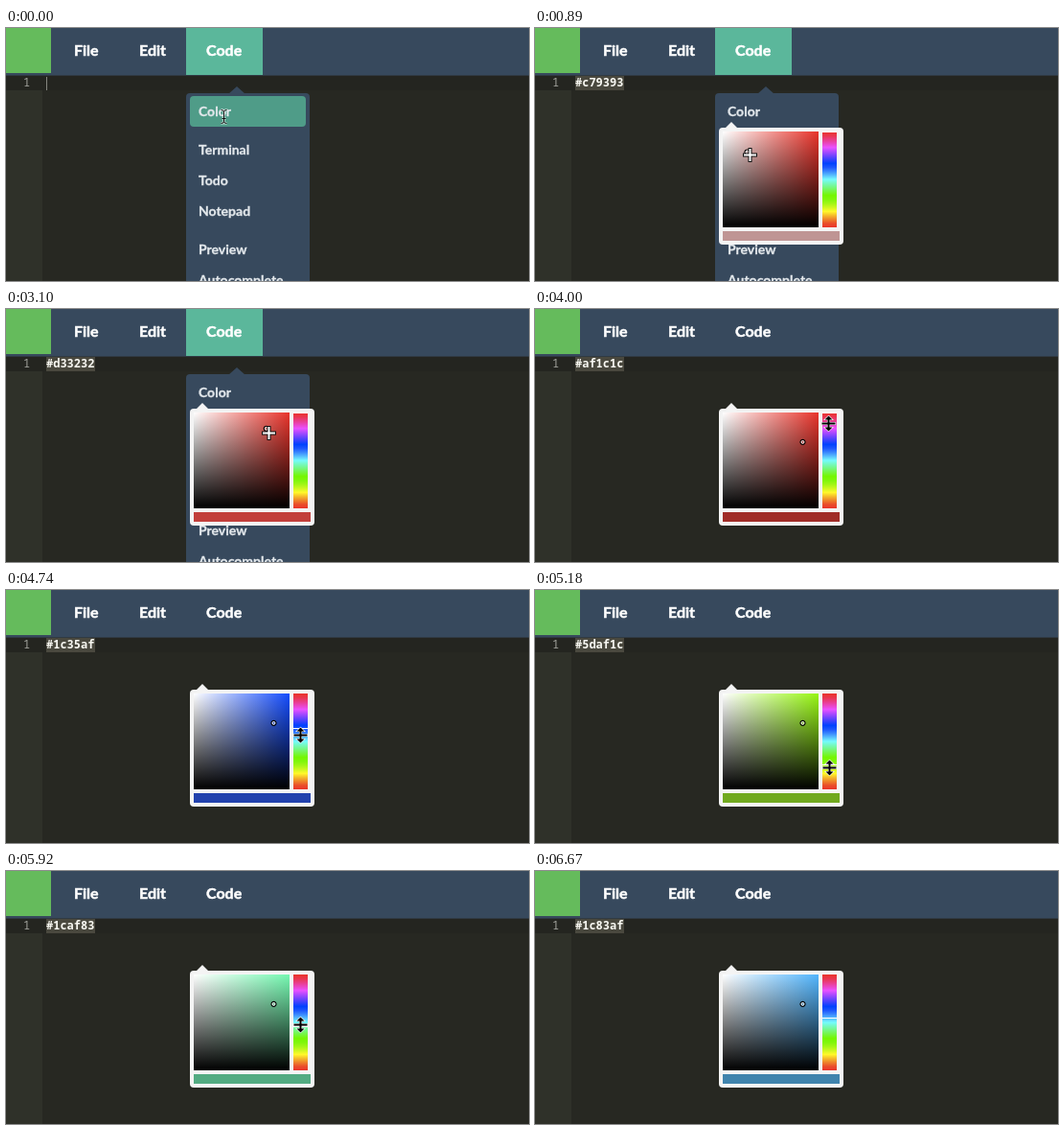
An HTML page for the animation above (7.24 s loop, 546 by 264 pixels).

```html
<!DOCTYPE html>
<html lang="en">
<head>
<meta charset="utf-8">
<title>Colour picker in a code editor</title>
<style>
  html, body { margin: 0; width: 100%; height: 100%; overflow: hidden; background: #272822; }
  svg { display: block; width: 546px; height: 264px; }
  .bar { font: 700 16px Lato, sans-serif; fill: #fff; stroke: #fff; stroke-width: .5; }
  .item { font: 700 14px Lato, sans-serif; fill: #e3e8ec; stroke: #e3e8ec; stroke-width: .3; }
  .code { font: 700 12px "Noto Sans Mono", "DejaVu Sans Mono", monospace; fill: #f8f8f2; }
  .line { font: 12px "Noto Sans Mono", "DejaVu Sans Mono", monospace; fill: #a0a19b; }
</style>
</head>
<body>
<svg viewBox="0 0 546 264">
  <defs>
    <linearGradient id="white"><stop stop-color="#fff"/><stop offset="1" stop-color="#fff" stop-opacity="0"/></linearGradient>
    <linearGradient id="black" x2="0" y2="1"><stop stop-opacity="0"/><stop offset="1"/></linearGradient>
    <linearGradient id="spectrum" x2="0" y2="1"></linearGradient>
  </defs>

  <rect width="546" height="264" fill="#272822"/>
  <rect y="50" width="38" height="214" fill="#2f3129"/>
  <rect y="50" width="546" height="15" fill="#242520"/>
  <text class="line" x="18" y="61">1</text>
  <rect id="caret" x="42" y="51" width="1" height="14" fill="#85867f"/>
  <rect id="selection" x="42" y="50" width="51" height="15" fill="#49483e"/>
  <text id="code" class="code" x="42" y="61"></text>

  <rect width="546" height="49" fill="#37495d"/>
  <rect y="49" width="546" height="1" fill="#303a43"/>
  <rect width="47" height="47" fill="#65bb5c"/>
  <rect id="tab" x="188" width="80" height="49" fill="#5bb79b"/>
  <g class="bar">
    <text x="71" y="29">File</text>
    <text x="139" y="29">Edit</text>
    <text x="209" y="29">Code</text>
  </g>

  <g id="menu">
    <path d="M232 69L241 61L250 69Z" fill="#37495d"/>
    <rect x="188" y="68" width="129" height="210" rx="4" fill="#37495d"/>
    <rect id="hover" x="192" y="71" width="121" height="32" rx="4" fill="#4f9c88"/>
    <g class="item">
      <text x="201" y="92">Color</text>
      <text x="201" y="132">Terminal</text>
      <text x="201" y="164">Todo</text>
      <text x="201" y="196">Notepad</text>
      <text x="201" y="236">Preview</text>
      <text x="201" y="268">Autocomplete</text>
    </g>
  </g>

  <g id="picker">
    <path d="M198 105L205 98L212 105Z" fill="#f4f4f4"/>
    <rect x="192" y="104" width="130" height="122" rx="4" fill="#f4f4f4"/>
    <rect id="field" x="196" y="108" width="100" height="100"/>
    <rect x="196" y="108" width="100" height="100" fill="url(#white)"/>
    <rect x="196" y="108" width="100" height="100" fill="url(#black)"/>
    <rect x="300" y="108" width="15" height="100" fill="url(#spectrum)"/>
    <rect id="slider" x="300" width="15" height="1" fill="#fff"/>
    <rect id="swatch" x="196" y="212" width="122" height="10"/>
    <g id="marker" fill="none">
      <circle r="2.5" stroke="#000" stroke-width="1.2"/>
      <circle r="1.4" stroke="#fff"/>
    </g>
  </g>

  <g id="beam" fill="none">
    <path d="M-3 -7Q0 -7 0 -5V5Q0 7 -3 7M3 -7Q0 -7 0 -5V5Q0 7 3 7M-2 2H2" stroke="#fff" stroke-width="2.4" opacity=".6"/>
    <path d="M-3 -7Q0 -7 0 -5V5Q0 7 -3 7M3 -7Q0 -7 0 -5V5Q0 7 3 7M-2 2H2" stroke="#111"/>
  </g>
  <g id="cross">
    <path d="M-7.5 0H7.5M0 -7.5V7.5" stroke="#111" stroke-width="4"/>
    <path d="M-6.5 0H6.5M0 -6.5V6.5" stroke="#fff" stroke-width="2"/>
  </g>
  <path id="resize" d="M0 -8L4 -4H1V-1H7V1H1V4H4L0 8L-4 4H-1V1H-7V-1H-1V-4H-4Z"
        fill="#000" stroke="#fff" stroke-width="1.2" paint-order="stroke"/>
</svg>
<script>
const LOOP = 7240, STEP = 148.2;
const LEFT = 196, TOP = 108, BOTTOM = 208;
// Steps at which the scene changes.
const OPEN = 1, FIELD_DRAG = 6, FIELD_END = 23, MENU_CLOSE = 25, HUE_DRAG = 29, LEAVE = 44;
const LAG = 0.5; // the picker trails the pointer by half a step

const $ = id => document.getElementById(id);
const show = (id, on) => $(id).setAttribute("display", on ? "inline" : "none");
const move = (id, x, y) => $(id).setAttribute("transform", `translate(${x} ${y})`);
const clamp = p => Math.max(0, Math.min(1, p));
const mix = (a, b, p) => a.map((v, i) => v + (b[i] - v) * p);

// Turning points of the two drags.
const fieldDrag = [
  { at: 6, to: [222, 130] }, { at: 9, to: [236, 140] }, { at: 10, to: [236, 140] },
  { at: 13, to: [248.4, 150.35] }, { at: 15, to: [246, 156] }, { at: 18, to: [262, 118] },
  { at: 21, to: [272.3, 125.25] }, { at: 23, to: [280, 139.37] }
];
const hueDrag = [
  { at: 30, to: [119] }, { at: 35, to: [182.04] }, { at: 36.5, to: [191] },
  { at: 40, to: [162.99] }, { at: 42, to: [153.01] }
];

function along(path, k) {
  const i = Math.max(1, path.findIndex(p => p.at >= k));
  const [a, b] = k > path.at(-1).at ? path.slice(-2) : [path[i - 1], path[i]];
  return mix(a.to, b.to, clamp((k - a.at) / (b.at - a.at)));
}

function pointer(k) {
  if (k < FIELD_DRAG) return mix([227, 92], fieldDrag[0].to, clamp((k - OPEN) / 2));
  if (k <= FIELD_END) return along(fieldDrag, k + LAG);
  if (k < HUE_DRAG) return mix(fieldDrag.at(-1).to, [306, 119], clamp((k - FIELD_END) / 4));
  return k < LEAVE ? [307, along(hueDrag, k + LAG)[0]] : [385, 232];
}

function hsv(h, s, v) {
  return [5, 3, 1].map(n => {
    const q = (n + h / 60) % 6;
    return Math.round(255 * v * (1 - s * Math.max(0, Math.min(q, 4 - q, 1))));
  });
}
const hex = rgb => "#" + rgb.map(c => c.toString(16).padStart(2, "0")).join("");

// Colours as recorded on a wide-gamut screen, mixed in linear light.
function screen(rgb) {
  const [r, g, b] = rgb.map(c => (c / 255) ** 2.2);
  const wide = [0.82 * r + 0.18 * g, 0.03 * r + 0.92 * g + 0.05 * b, 0.02 * r + 0.98 * b];
  return hex(wide.map(c => Math.round(255 * c ** (1 / 2.2))));
}

for (let i = 0; i <= 24; i++) {
  const stop = document.createElementNS("http://www.w3.org/2000/svg", "stop");
  stop.setAttribute("offset", i / 24);
  stop.setAttribute("stop-color", screen(hsv(360 - i * 15, 1, 1)));
  $("spectrum").append(stop);
}

function draw(t) {
  const k = Math.floor((t + 13) / STEP);
  const typed = k >= FIELD_DRAG, menuOpen = k < MENU_CLOSE;
  const [markX, markY] = typed ? along(fieldDrag, k) : [LEFT, BOTTOM];
  const hueY = k < HUE_DRAG ? TOP : along(hueDrag, k)[0];
  const hue = (BOTTOM - hueY) * 3.6;
  const color = hsv(hue, (markX - LEFT) / 100, (BOTTOM - markY) / 100);

  show("caret", !typed);
  show("selection", typed);
  $("code").textContent = typed ? hex(color) : "";

  show("tab", menuOpen);
  show("menu", menuOpen);
  show("hover", k < 2);

  show("picker", k >= OPEN);
  $("field").setAttribute("fill", screen(hsv(hue, 1, 1)));
  $("swatch").setAttribute("fill", screen(color));
  $("slider").setAttribute("y", Math.round(hueY - 0.5));
  show("marker", typed);
  move("marker", markX - 0.5, markY - 0.5);

  const cursor = k < 2 || k === LEAVE ? "beam" : menuOpen ? "cross" : k < LEAVE ? "resize" : "";
  const [x, y] = pointer(k).map(Math.round);
  for (const id of ["beam", "cross", "resize"]) {
    show(id, id === cursor);
    move(id, x + 0.5, y + 0.5);
  }
}

function tick() {
  draw(performance.now() % LOOP);
  requestAnimationFrame(tick);
}
tick();
</script>
</body>
</html>
```
